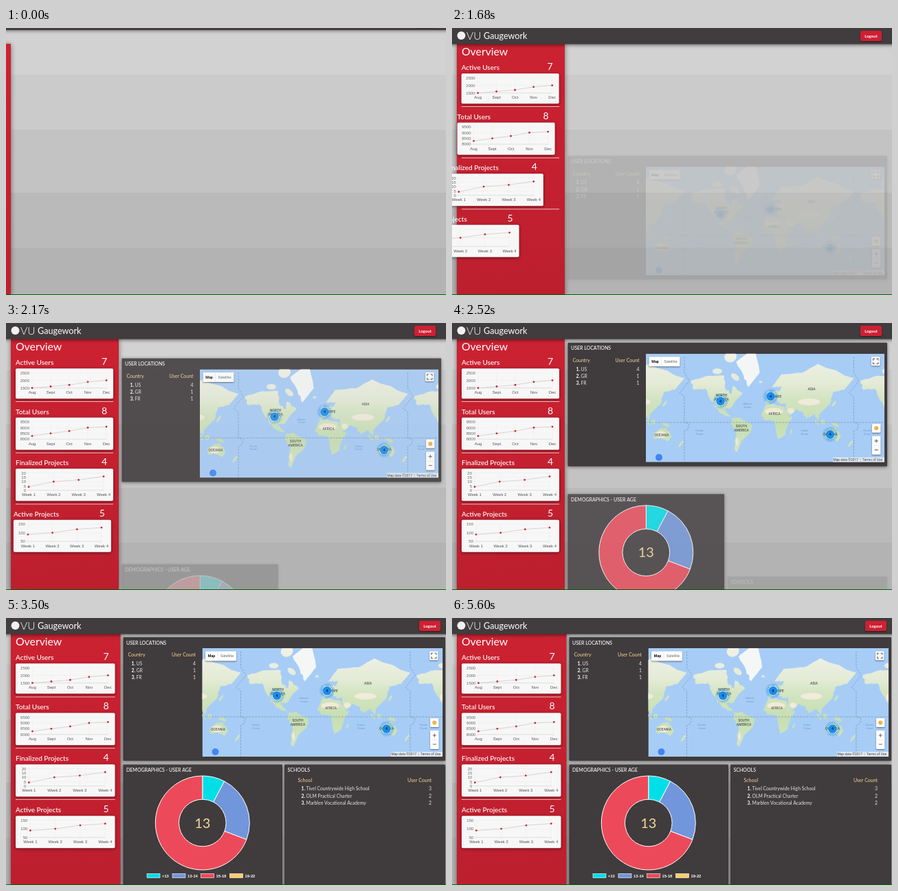
An HTML page with a canvas that plays this animation: 640x389 px, repeating every 5.67 s.

```html
<!DOCTYPE html>
<html lang="en">
<head>
<meta charset="utf-8">
<title>Dashboard</title>
<style>
  html, body { margin: 0; width: 100%; height: 100%; overflow: hidden; background: #c3c3c3; }
  canvas { display: block; width: 640px; height: 389px; }
</style>
</head>
<body>
<canvas id="stage" width="640" height="389"></canvas>
<script>
const W = 640, H = 389, LOOP = 5670, SLIDE = 1060, REFLOW = 3480;
const SANS = 'Lato, "Open Sans", sans-serif', ARIAL = '"Liberation Sans", Arial, sans-serif', MAPFONT = 'Roboto, sans-serif';
const PANEL = '#403b3c', CREAM = '#f3d79b', RED = '#cf2033';
const stage = document.getElementById('stage').getContext('2d');
const buffer = Object.assign(document.createElement('canvas'), { width: W, height: H }).getContext('2d');
let ctx = stage;

// CSS "ease": cubic-bezier(.25, .1, .25, 1)
function ease(x) {
  if (x <= 0) return 0;
  if (x >= 1) return 1;
  const bezier = (u, a, b) => 3 * u * (1 - u) ** 2 * a + 3 * u * u * (1 - u) * b + u ** 3;
  let lo = 0, hi = 1;
  for (let i = 0; i < 24; i++) {
    const mid = (lo + hi) / 2;
    if (bezier(mid, .25, .25) < x) lo = mid; else hi = mid;
  }
  return bezier(lo, .1, 1);
}
const progress = (t, start) => ease((t - start) / SLIDE);

// y is the middle of the capitals
function text(str, x, y, size, color = '#fff', { align = 'left', weight = 400, font = SANS, style = '' } = {}) {
  ctx.font = `${style} ${weight} ${size}px ${font}`;
  ctx.textAlign = align;
  ctx.fillStyle = color;
  ctx.fillText(str, x, y + size * .36);
}
function box(x, y, w, h, color, radius = 0, shadow = 0) {
  ctx.save();
  if (shadow) {
    ctx.shadowColor = 'rgba(0,0,0,.5)';
    ctx.shadowBlur = shadow;
    ctx.shadowOffsetY = 1;
  }
  ctx.fillStyle = color;
  ctx.beginPath();
  ctx.roundRect(x, y, w, h, radius);
  ctx.fill();
  ctx.restore();
}
function ellipse(x, y, rx, ry, color, tilt = 0) {
  ctx.fillStyle = color;
  ctx.beginPath();
  ctx.ellipse(x, y, rx, ry, tilt, 0, 7);
  ctx.fill();
}
const disc = (x, y, r, color) => ellipse(x, y, r, r, color);
function line(points, color, width = 1, dash = []) {
  ctx.strokeStyle = color;
  ctx.lineWidth = width;
  ctx.setLineDash(dash);
  ctx.beginPath();
  points.forEach(p => ctx.lineTo(...p));
  ctx.stroke();
  ctx.setLineDash([]);
}
const hline = (x1, x2, y, ...style) => line([[x1, y], [x2, y]], ...style);
const vline = (x, y1, y2, ...style) => line([[x, y1], [x, y2]], ...style);
function layer(alpha, draw) {
  if (alpha <= 0) return;
  if (alpha >= 1) return draw();
  ctx = buffer;
  ctx.clearRect(0, 0, W, H);
  draw();
  ctx = stage;
  ctx.globalAlpha = alpha;
  ctx.drawImage(buffer.canvas, 0, 0);
  ctx.globalAlpha = 1;
}

function background() {
  box(0, 0, W, H, '#d2d2d2');
  box(0, 68, W, H, '#cbcbcb');
  box(0, 148, W, H, '#c3c3c3');
  box(0, 240, W, H, '#bababa');
  box(0, 320, W, H, '#b3b3b3');
}

function header(t, wide) {
  const y = -23.5 * (1 - progress(t, -124));
  box(-6, y - 8, W + 12, 31.5, '#413c3d', 0, 5);
  disc(13.5, y + 11, 6, '#f2f0f0');
  text('VU', 21, y + 11, 15.5, '#fff', { weight: 300 });
  text('Gaugework', 46, y + 11, 12.6);
  const x = wide ? 601 : 594;
  box(x, y + 4, 31, 15, RED, 2, 2);
  text('Logout', x + 15.5, y + 11.5, 6, '#fff', { align: 'center', weight: 700 });
}

const MONTHS = ['Aug', 'Sept', 'Oct', 'Nov', 'Dec'];
const WEEKS = ['Week 1', 'Week 2', 'Week 3', 'Week 4'];
const ROWS = [
  { title: 'Active Users', count: 7, y: 57.5, h: 44, left: 24, right: 132, min: 1500, max: 2500, step: 500, labels: MONTHS, values: [1500, 1600, 1700, 1900, 2000] },
  { title: 'Total Users', count: 8, y: 129, h: 47, left: 24, right: 132, min: 8000, max: 9500, step: 500, labels: MONTHS, values: [8275, 8500, 8700, 9000, 9080] },
  { title: 'Finalized Projects', count: 4, y: 203.5, h: 47, left: 19, right: 128, min: 0, max: 20, step: 5, labels: WEEKS, values: [4, 10, 12, 16] },
  { title: 'Active Projects', count: 5, y: 278, h: 47, left: 21, right: 128, min: 50, max: 150, step: 50, labels: WEEKS, values: [90, 100, 120, 130] }
];

function chart(row, x, y, w) {
  const stretch = w / 142, top = y + 6.3, bottom = y + row.h - 15.5;
  box(x, y, w, row.h, '#f8f7f7', 2, 4);
  const px = i => x + (row.left + (row.right - row.left) * i / (row.labels.length - 1)) * stretch;
  const py = v => bottom - (v - row.min) / (row.max - row.min) * (bottom - top);
  const first = px(0), last = px(row.labels.length - 1);
  for (let v = row.min; v <= row.max; v += row.step) {
    hline(first - 2, last, py(v), v === row.min ? '#cfcfcf' : '#ececec', .6);
    text(v, first - 4, py(v), 6, '#666', { align: 'right', font: ARIAL });
  }
  row.labels.forEach((label, i) => {
    vline(px(i), top, bottom + 2, '#ececec', .6);
    text(label, px(i), bottom + 6.5, 6, '#555', { align: 'center', font: ARIAL });
  });
  const points = row.values.map((v, i) => [px(i), py(v)]);
  line(points, '#cfc9ca', .8);
  points.forEach(p => disc(...p, 1.4, RED));
}

function sidebar(t, wide) {
  const dx = -157 * (1 - progress(t, 460)), w = wide ? 144.5 : 142;
  const fill = ctx.createLinearGradient(0, 23, 40, H);
  fill.addColorStop(0, '#cc2232');
  fill.addColorStop(1, '#bd1f2e');
  box(7 + dx, 23, w + 15, H - 23, fill, 0, 7);
  text('Overview', 14 + dx, 34.5, 15.8);
  ROWS.forEach((row, i) => {
    const x = 14 + dx - 149 * (1 - progress(t, 690 + 206 * i));
    const y = row.y + (wide ? .5 * i : 0);
    if (i < 3) hline(14 + dx, 14 + dx + w, 114.5 + 74.7 * i + (wide ? .5 : 0), 'rgba(255,255,255,.75)');
    text(row.title, x, y, 10, '#fff', { weight: 500 });
    text(row.count, x + w - 13, y - 1.5, 14, '#fff', { align: 'center' });
    chart(row, x, y + 8.7, w);
  });
}

// Mercator: degrees to map pixels
const WORLD = 246.4;
const project = (lon, lat) => [56 + (lon + 180) * WORLD / 360,
  100 - WORLD / (2 * Math.PI) * Math.log(Math.tan(Math.PI / 4 + lat * Math.PI / 360))];
const pairs = list => list.flatMap((v, i) => i % 2 ? [] : [project(v, list[i + 1])]);

// A coast through a few longitude, latitude pairs, roughened between them
function coast(list, color) {
  const points = pairs(list);
  ctx.fillStyle = color;
  ctx.beginPath();
  points.forEach(([x, y], i) => {
    const [nx, ny] = points[(i + 1) % points.length];
    for (let k = 0; k < 4; k++) {
      const rough = k && .9 * Math.sin(i * 7.3 + k * 2.6);
      ctx.lineTo(x + (nx - x) * k / 4 + rough, y + (ny - y) * k / 4 - rough);
    }
  });
  ctx.fill();
}
const patch = (lon, lat, rx, ry, color, tilt) => ellipse(...project(lon, lat), rx, ry, color, tilt);

function americas(land) {
  coast([-166,66, -128,70, -95,70, -93,58, -80,52, -77,61, -56,52, -70,43, -81,29, -97,28, -88,19, -78,8, -105,20, -124,42, -135,58, -160,57], land);
  coast([-78,9, -62,10, -35,-6, -40,-22, -58,-36, -68,-54, -74,-50, -70,-18, -81,-4], land);
  coast([-70,78, -30,83, -20,72, -44,60, -54,70], '#f5f7f6');
  patch(-110, 73, 7, 4, land);
  patch(-82, 80, 9, 8, land, -.4);
  patch(-72, 69, 7, 4, land, .7);
  patch(-110, 38, 5, 6, '#eeeada');
  patch(-68, -38, 2, 6, '#efe9d8');
}
function eurasia(land) {
  coast([-9,37, -2,47, 9,56, 22,55, 27,60, 18,60, 6,60, 26,71, 70,72, 104,77, 180,68, 160,57, 136,54, 129,36, 121,30, 108,18, 104,2, 97,17, 79,8, 70,22, 57,26, 44,13, 35,30, 36,37, 23,37, 13,45, 0,38], land);
  patch(-2, 53, 2, 4, land);
  patch(138, 37, 1.5, 5, land, .6);
  patch(-18, 65, 2.5, 1.6, land);
  patch(46, 24, 5, 4, '#f1ead6');
  patch(85, 40, 16, 5, '#f0ebdb');
}
function southernLands(land) {
  coast([-6,36, 11,36, 33,31, 43,12, 51,12, 40,-4, 33,-27, 19,-34, 10,4, -8,5, -17,16], land);
  coast([114,-23, 130,-12, 142,-12, 153,-28, 145,-38, 131,-31, 116,-34], land);
  patch(47, -19, 1.3, 4, land, .3);
  patch(101, 0, 1.3, 5, land, -.7);
  patch(114, 1, 3, 3.5, land);
  patch(141, -5, 6, 2.3, land, .4);
  patch(173, -41, 1.6, 6, land, .6);
  patch(10, 23, 13, 5, '#f1ead6');
  patch(130, -25, 8, 5, '#f0ead8');
}

function cluster(x, y) {
  for (const [r, alpha] of [[8.2, .75], [10.2, .4]]) {
    ctx.setLineDash([1.5, 1]);
    ctx.strokeStyle = `rgba(25,130,230,${alpha})`;
    ctx.lineWidth = 1.5;
    ctx.beginPath();
    ctx.arc(x, y, r, 0, 7);
    ctx.stroke();
  }
  ctx.setLineDash([]);
  disc(x, y, 6.3, '#1a8cec');
  text('4', x, y, 5.5, '#123', { align: 'center', weight: 700, font: ARIAL });
}

function mapLabels() {
  const place = (x, y, ...words) => words.forEach((s, i) =>
    text(s, x, y + 6 * i, 5, '#4f5550', { align: 'center', weight: 500, font: MAPFONT }));
  const ocean = (name, x, y) => [name, 'Ocean'].forEach((s, i) =>
    text(s, x, y + 4.5 * i, 4, '#6c9bd0', { align: 'center', font: MAPFONT, style: 'italic' }));
  place(241, 51, 'ASIA');
  place(187, 87, 'AFRICA');
  place(139, 105, 'SOUTH', 'AMERICA');
  place(110, 60, 'NORTH', 'AMERICA');
  place(188, 62, 'EUROPE');
  place(23, 118, 'OCEANIA');
  place(268, 117, 'OCEANIA');
  ocean('Atlantic', 148, 73);
  ocean('Pacific', 78, 112);
  ocean('Indian', 231, 112);
  ocean('Pacific', 322, 112);
}

function mapControls(w, h) {
  const control = (x, y, cw, ch) => box(x, y, cw, ch, '#fff', 1, 2);
  control(4.5, 4.5, 45, 14);
  vline(22.5, 4.5, 18.5, '#e3e3e3', .6);
  text('Map', 13.5, 11.5, 5.3, '#111', { align: 'center', weight: 700, font: MAPFONT });
  text('Satellite', 36, 11.5, 5.3, '#666', { align: 'center', font: MAPFONT });
  control(w - 19, 4.5, 12.5, 13);
  for (const sx of [-1, 1]) for (const sy of [-1, 1]) {
    const x = w - 12.8 + sx * 3.7, y = 11 + sy * 3.7;
    line([[x - sx * 2.5, y], [x, y], [x, y - sy * 2.5]], '#666', 1.1);
  }
  const mid = w - 11.8;
  control(w - 18, 102, 12.5, 13);
  disc(mid, 108.5, 3, '#f0b440');
  control(w - 18, 120, 12.5, 27);
  hline(mid - 4, mid + 4, 133.5, '#e0e0e0', .6);
  hline(mid - 2.5, mid + 2.5, 127, '#666', 1.1);
  vline(mid, 124.5, 129.5, '#666', 1.1);
  hline(mid - 2.5, mid + 2.5, 140, '#666', 1.1);

  disc(19, h - 7, 5, '#4285f4');
  box(w - 75, h - 7, 75, 7, 'rgba(245,245,245,.75)');
  text('Terms of Use', w - 3, h - 3.4, 4.9, '#444', { align: 'right', font: MAPFONT });
  vline(w - 35, h - 6, h - 1, '#999', .5);
  text('Map data ©2017', w - 38, h - 3.4, 4.9, '#444', { align: 'right', font: MAPFONT });
}

function worldMap(x, y, w, h) {
  ctx.save();
  ctx.translate(x, y);
  ctx.beginPath();
  ctx.rect(0, 0, w, h);
  ctx.clip();
  box(0, 0, w, h, '#a7cdf6');
  const land = ctx.createLinearGradient(0, 0, 0, h);
  land.addColorStop(0, '#f1f2ea');
  land.addColorStop(.28, '#e4ebd6');
  land.addColorStop(.42, '#d3e4c1');
  land.addColorStop(.65, '#c6dfb2');
  land.addColorStop(1, '#dbe6ca');
  for (let k = -1; k <= 1; k++) {
    ctx.save();
    ctx.translate(k * WORLD, 0);
    americas(land);
    eurasia(land);
    southernLands(land);
    line(pairs([180,80, 180,72, 191,66, 170,53, 180,48, 180,0, 190,-3, 188,-14, 180,-18, 180,-70]), '#7b92b4', .7, [3, 1.5]);
    ctx.restore();
  }
  hline(0, w, 100, '#7b92b4', .7, [3, 1.5]);
  mapLabels();
  cluster(108.5, 69);
  cluster(181.5, 62);
  cluster(268, 117.5);
  mapControls(w, h);
  ctx.restore();
}

function table(x, right, y, heading, rows, gap) {
  text(heading, x, y, 7, CREAM);
  text('User Count', right, y, 7, CREAM, { align: 'right' });
  rows.forEach(([name, count], i) => {
    const rowY = y + gap + 10.1 * i;
    text(i + 1 + '.', x + 5, rowY, 6.8, '#fff', { weight: 700 });
    text(name, x + 12, rowY, 6.8, '#e6e4e4');
    text(count, right, rowY, 6.8, '#e6e4e4', { align: 'right' });
  });
}
function panel(x, y, right, h, title) {
  box(x, y, right - x, h, PANEL, 1, 5);
  text(title, x + 4.5, y + 8, 7, '#fff', { weight: 500 });
}

function locations(dy, wide) {
  const x = wide ? 170.5 : 168.5, right = wide ? 639 : 633;
  const mapX = wide ? 285.5 : 282;
  panel(x, 28 + dy, right, 180, 'USER LOCATIONS');
  table(x + 7, wide ? 276 : 272.5, 54 + dy - (wide ? .5 : 0), 'Country', [['US', 4], ['GR', 1], ['FR', 1]], 12.8);
  worldMap(mapX, 44 + dy, right - 4 - mapX, 158);
}

const AGES = [['<13', 1, '#00dfe8', 0], ['13-14', 3, '#7196db', 37], ['15-18', 9, '#ec4a5a', 78.5], ['19-22', 0, '#f6cf6b', 120.5]];
function demographics(dy, wide) {
  const shift = wide ? 3.5 : 0, cx = 282.3 + shift, cy = 298.5 + dy;
  panel(wide ? 170.5 : 168.5, 213.5 + dy, wide ? 402 : 396, 180, 'DEMOGRAPHICS - USER AGE');
  let angle = -Math.PI / 2;
  AGES.forEach(([label, count, color, offset]) => {
    const end = angle + count / 13 * 2 * Math.PI;
    ctx.lineWidth = 1;
    ctx.strokeStyle = '#fff';
    if (count) {
      ctx.fillStyle = color;
      ctx.beginPath();
      ctx.arc(cx, cy, 68.5, angle, end);
      ctx.arc(cx, cy, 34.3, end, angle, true);
      ctx.closePath();
      ctx.fill();
      ctx.stroke();
    }
    angle = end;
    const lx = 201.5 + shift + offset;
    box(lx, 372.5 + dy, 19, 6, color);
    ctx.lineWidth = .6;
    ctx.strokeRect(lx, 372.5 + dy, 19, 6);
    text(label, lx + 22, 375.5 + dy, 5.8, '#fff', { weight: 700, font: ARIAL });
  });
  text('13', cx, cy, 20, CREAM, { align: 'center' });
}

function schools(dy, wide) {
  const x = wide ? 405 : 401;
  panel(x, 213.5 + dy, wide ? 639 : 633, 180, 'SCHOOLS');
  table(x + 19.5, wide ? 619 : 612, 236 + dy, 'School',
    [['Tivel Countrywide High School', 3], ['OLM Practical Charter', 2], ['Marblen Vocational Academy', 2]], 13);
}

function rise(t, draw, start, height) {
  const p = progress(t, start);
  layer(p, () => draw(height * (1 - p), t >= REFLOW));
}

function render(t) {
  background();
  rise(t, locations, 1558, 180);
  rise(t, demographics, 1997, 176);
  rise(t, schools, 2403, 176);
  sidebar(t, t >= REFLOW);
  header(t, t >= REFLOW);
  box(0, H - 1, W, 1, '#006400');
}

const begin = performance.now();
function tick() {
  render((performance.now() - begin) % LOOP);
  requestAnimationFrame(tick);
}
tick();
</script>
</body>
</html>
```
